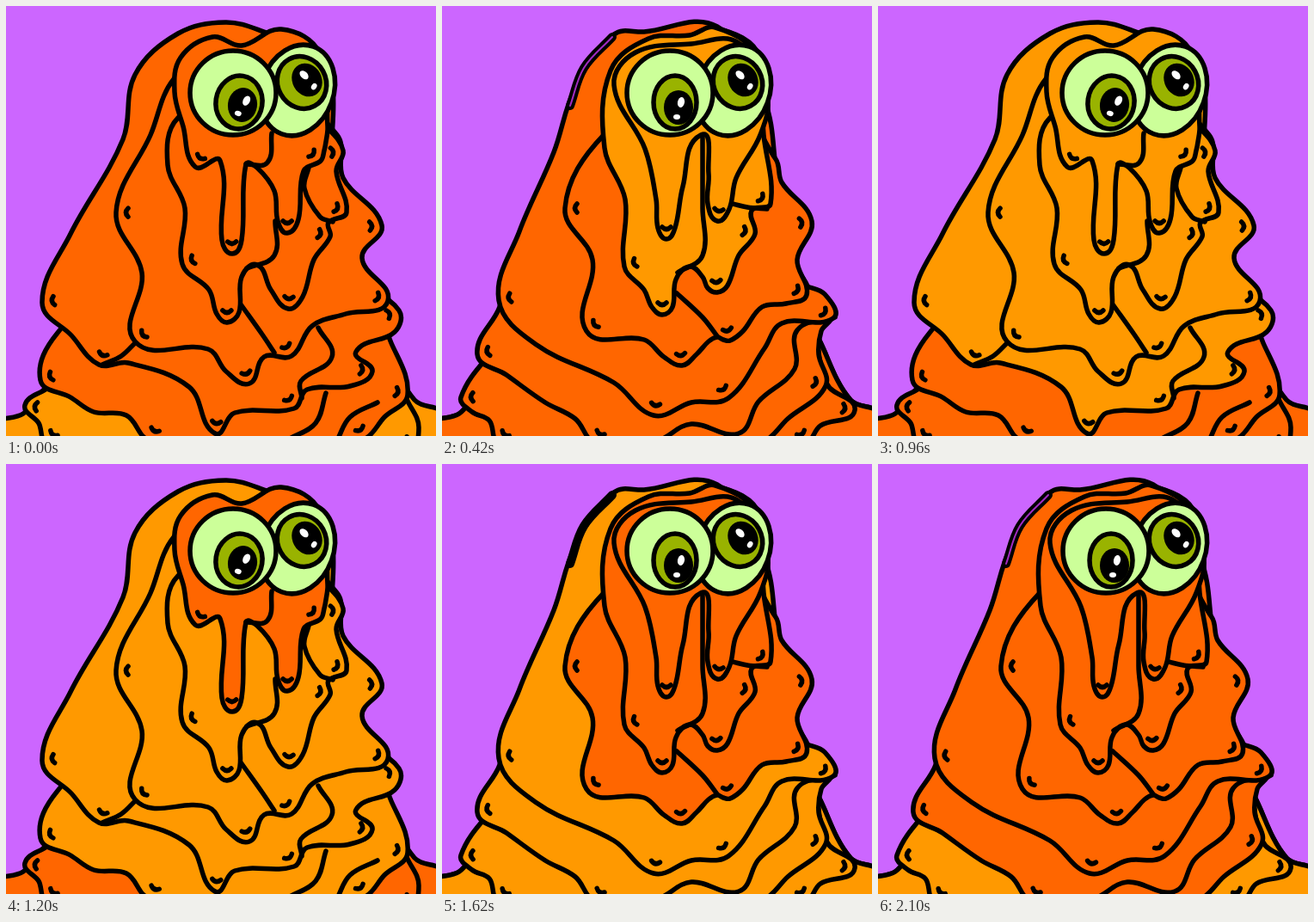
An HTML page with a canvas that plays this animation: 500x500 px, repeating every 2160 ms.

```html
<!DOCTYPE html>
<html lang="en">
<head>
<meta charset="utf-8">
<title>Melting blob</title>
<style>
html, body { margin: 0; width: 100%; height: 100%; overflow: hidden; background: #cc66ff; }
canvas { display: block; width: 100vw; height: 100vh; }
</style>
</head>
<body>
<canvas id="stage" width="500" height="500"></canvas>
<script>
const ctx = document.getElementById('stage').getContext('2d');
const STEP = 60, PHASES = 4, CYCLES = 9;
const PURPLE = '#cc66ff', RED = '#ff6600', AMBER = '#ff9900';

const mix = (a, b, f) => a + (b - a) * f;
const mixAll = (a, b, f) => a.map((v, i) => mix(v, b[i], f));

// Only the bulges, tips and valleys of each layer are given; the curve rule
// rounds them. During a cycle a layer oozes from pose a to pose b.
const lid = [225,54, 200,92, 236,166, 249,225, 251,258, 261,271, 271,258, 280,210, 301,150, 310,195,
  309,230, 320,250, 334,236, 342,200, 370,150, 378,105, 345,43, 290,44];
const puddle = [150,350, 40,450, 20,474, -15,486, -20,515, 300,520, 520,515, 510,474, 475,458, 400,350];

const layers = [
  // a new lid starts tucked away behind the eyes
  { a: lid.map((v, i) => i % 2 && v > 100 ? mix(100, v, .35) : v), b: lid },
  {
    a: [203,60, 196,100, 206,140, 220,187, 249,180, 251,272, 263,288, 274,272, 279,184, 292,188, 312,215,
      316,250, 327,264, 340,248, 346,192, 366,180, 370,168, 372,158, 374,140, 365,55, 320,27, 274,46, 240,36],
    b: [196,75, 189,165, 213,225, 212,303, 235,330, 244,350, 256,359, 268,350, 272,318, 288,303, 303,315,
      309,328, 320,333, 332,325, 345,290, 364,265, 360,238, 382,230, 374,150, 365,58, 318,25, 288,34, 240,38],
    foldsA: [[279,184, 304,182, 309,148]],
    foldsB: [[274,310, 303,290, 303,235, 303,150], [338,230, 355,234, 378,236]]
  },
  {
    a: [200,130, 188,185, 208,235, 205,300, 236,330, 245,358, 257,368, 271,356, 274,315, 292,301, 308,330,
      328,352, 345,338, 358,295, 377,268, 375,252, 396,240, 384,192, 392,168, 372,140, 300,70],
    b: [188,150, 143,235, 175,295, 168,378, 235,388, 258,408, 279,418, 296,405, 310,390, 320,385, 327,388,
      335,389, 350,378, 372,350, 400,346, 424,336, 413,295, 430,250, 395,205, 388,178, 300,70],
    foldsA: [[280,305, 312,290, 313,250], [352,188, 347,212, 365,245, 380,251]],
    foldsB: [[273,334, 303,362, 320,384]]
  },
  {
    a: [195,85, 168,150, 128,240, 158,310, 150,390, 235,399, 256,425, 283,439, 300,408, 332,407, 356,372,
      395,358, 444,343, 414,293, 437,255, 392,200, 385,150, 290,70, 240,60],
    b: [200,33, 155,95, 130,170, 90,262, 66,342, 110,394, 200,438, 246,476, 290,461, 333,456, 375,398,
      395,369, 455,363, 445,335, 415,318, 390,200, 375,110, 320,24, 235,30],
    foldsA: [[273,347, 298,382, 312,403]]
  },
  {
    a: [200,32, 150,80, 136,155, 75,265, 42,345, 76,383, 108,417, 142,415, 213,443, 243,497, 266,473, 335,468,
      350,446, 400,442, 426,425, 407,402, 452,379, 457,354, 405,310, 380,200, 370,60, 300,30, 255,19],
    b: [202,35, 157,95, 132,170, 92,262, 67,350, 41,405, 75,429, 120,461, 155,480, 178,508, 250,515, 330,515,
      375,506, 402,480, 446,442, 438,405, 441,378, 452,360, 405,310, 380,200, 370,60, 318,26, 240,31],
    foldsA: [[112,417, 134,407, 150,392], [363,374, 379,408, 343,436, 344,456]],
    foldsB: [[457,362, 413,377, 410,422, 368,460, 345,497, 290,486, 257,503]]
  },
  {
    a: [150,300, 60,380, 40,435, 75,455, 102,472, 140,476, 168,505, 380,512, 418,503, 440,478, 467,452,
      448,392, 400,300],
    b: [150,300, 60,400, 22,455, 35,472, 55,482, 66,508, 150,515, 380,515, 424,508, 440,488, 480,470,
      448,440, 400,300],
    foldsA: [[330,503, 360,485, 372,450], [385,505, 400,478, 432,461]]
  },
  { a: [150,350, 50,443, 22,464, 38,485, 48,508, 300,520, 470,515, 480,490, 470,465, 400,350], b: puddle },
  { a: puddle, b: puddle }
];

function toPoints(flat) {
  return Array.from({ length: flat.length / 2 }, (_, i) => ({ x: flat[2 * i], y: flat[2 * i + 1] }));
}

// Smooth curve: each point's tangent is parallel to the chord of its neighbours
function trace(pts, closed) {
  const n = pts.length;
  const at = i => pts[closed ? (i + n) % n : Math.max(0, Math.min(n - 1, i))];
  const handle = (i, reach) => {
    const p = at(i), dx = at(i + 1).x - at(i - 1).x, dy = at(i + 1).y - at(i - 1).y;
    const k = reach / (Math.hypot(dx, dy) || 1);
    return [p.x + dx * k, p.y + dy * k];
  };
  ctx.beginPath();
  ctx.moveTo(pts[0].x, pts[0].y);
  for (let i = 0; i < (closed ? n : n - 1); i++) {
    const p = at(i), q = at(i + 1), reach = Math.hypot(q.x - p.x, q.y - p.y) * .36;
    ctx.bezierCurveTo(...handle(i, reach), ...handle(i + 1, -reach), q.x, q.y);
  }
}

// A short highlight sits just inside every rounded bulge
function drawHighlights(pts) {
  const n = pts.length, at = i => pts[(i + n) % n];
  const heading = i => Math.atan2(at(i + 1).y - at(i).y, at(i + 1).x - at(i).x);
  const turn = i => {
    const d = heading(i - 1) - heading(i);
    return Math.atan2(Math.sin(d), Math.cos(d));
  };
  pts.forEach((p, i) => {
    const bend = turn(i);
    if (p.y < 150 || bend < .6 || bend < turn(i - 1) || bend < turn(i + 1)) return;
    ctx.save();
    ctx.translate(p.x, p.y);
    ctx.rotate(heading(i) + bend / 2);
    ctx.beginPath();
    ctx.moveTo(-5, -14);
    ctx.quadraticCurveTo(0, -9, 5, -14);
    ctx.stroke();
    ctx.restore();
  });
}

function drawLayer({ a, b, foldsA = [], foldsB = [] }, color, phase) {
  const pts = toPoints(mixAll(a, b, phase / 3));
  trace(pts, true);
  ctx.fillStyle = color;
  ctx.fill();
  ctx.stroke();
  drawHighlights(pts);
  ctx.save();
  ctx.translate(0, [0, 18, -18, 0][phase]);
  for (const fold of phase < 2 ? foldsA : foldsB) {
    trace(toPoints(fold), false);
    ctx.stroke();
  }
  ctx.restore();
}

// Sketchy double line along the back of the head
function drawBackLine(gap) {
  ctx.save();
  trace(toPoints([149,116, 165,72, 198,36]), false);
  ctx.lineWidth = 10;
  ctx.stroke();
  ctx.strokeStyle = gap;
  ctx.lineWidth = 2;
  ctx.stroke();
  ctx.restore();
}

function oval(x, y, rx, ry, tilt, color, outlined) {
  ctx.beginPath();
  ctx.ellipse(x, y, rx, ry, tilt, 0, 7);
  ctx.fillStyle = color;
  ctx.fill();
  if (outlined) ctx.stroke();
}

// Iris, pupil and two glints around a gaze point
function drawIris(x, y, rx, tilt, px, py) {
  oval(x, y, rx, 31, tilt, '#99b300', true);
  oval(x + px, y + py, 17, 20, tilt, '#000');
  ctx.save();
  ctx.translate(x + px, y + py);
  ctx.rotate(tilt * 2);
  oval(3, -6, 4, 6, .2, '#fff');
  oval(-2, 11, 4, 3, 0, '#fff');
  ctx.restore();
}

function drawEyes(f) {
  oval(339, 98, 42, 54, .35, '#ccff99', true);
  drawIris(344, 89, 28, -.5, 6, -3);
  oval(264 + f, 101, 50, 49, 0, '#ccff99', true);
  drawIris(271, 112, 27 - 2 * f, .15 * (1 - f), 4, mix(3, 6, f));
}

// Four amber layers, then five red ones
function layerColor(id) {
  const n = (id + CYCLES) % CYCLES;
  return n >= 1 && n <= 4 ? AMBER : RED;
}

function draw(tick) {
  const phase = tick % PHASES, cycle = Math.floor(tick / PHASES);
  ctx.fillStyle = PURPLE;
  ctx.fillRect(0, 0, 500, 500);
  ctx.strokeStyle = '#000';
  ctx.lineWidth = 5.5;
  ctx.lineCap = ctx.lineJoin = 'round';
  for (let k = layers.length - 1; k >= 0; k--) {
    if (k === 0 && phase === 0) continue;
    const color = layerColor(cycle - k + 1);
    drawLayer(layers[k], color, phase);
    if (k === 3 && phase === 3) drawBackLine(color === RED ? '#a02bc0' : '#000');
  }
  drawEyes(phase / 3);
}

let last = -1;
const start = performance.now();
function loop() {
  const tick = Math.floor((performance.now() - start) / STEP) % (PHASES * CYCLES);
  if (tick !== last) draw(last = tick);
  requestAnimationFrame(loop);
}
loop();
</script>
</body>
</html>
```
